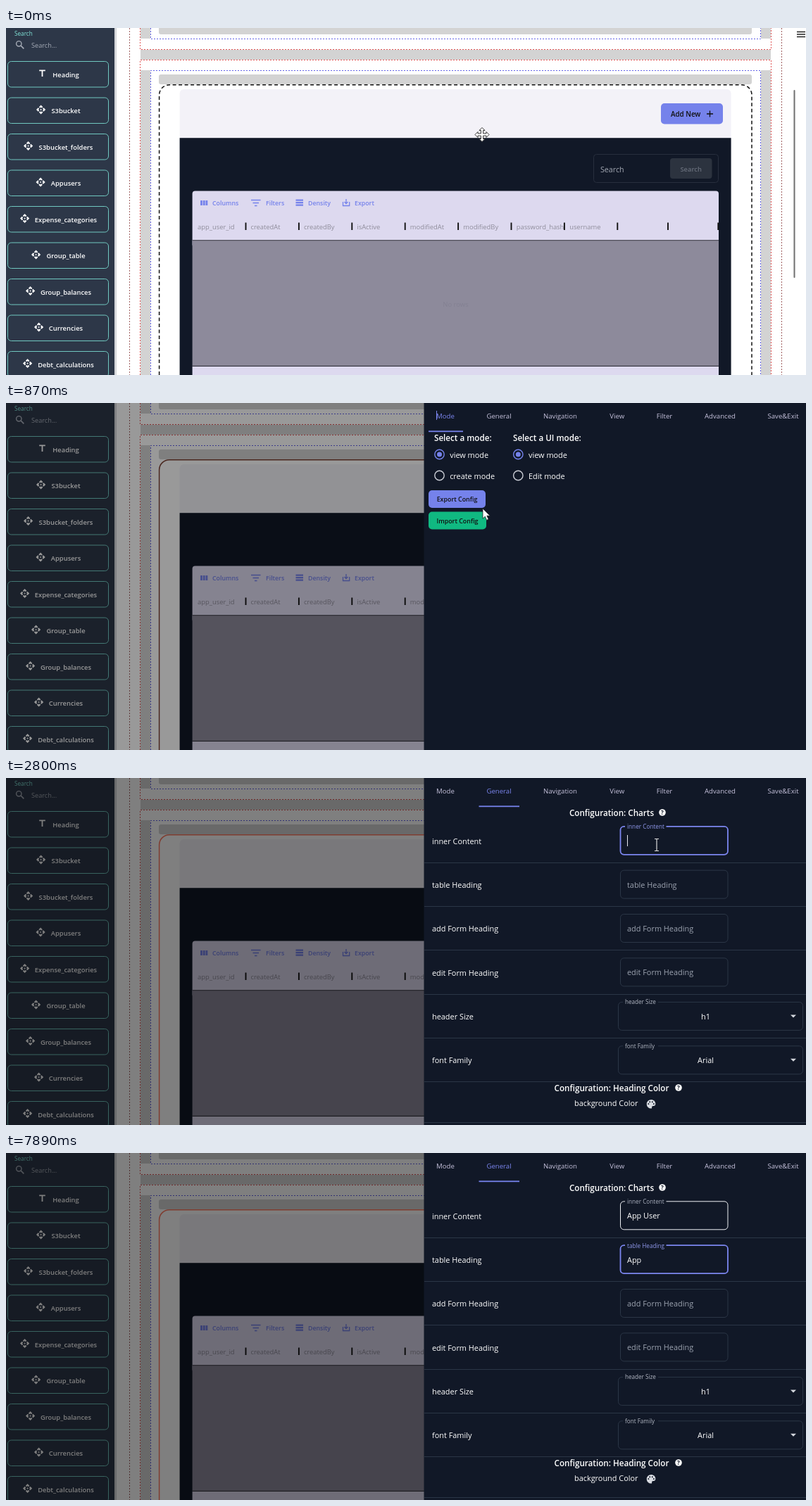
Write an HTML page that moves like this. It is 1136 px wide and 493 px high and loops after 8000 ms.

```html
<!DOCTYPE html>
<html lang="en">
<head>
<meta charset="utf-8">
<title>Table configuration</title>
<style>
  html, body { margin: 0; width: 100%; height: 100%; overflow: hidden; background: #fff; }
  svg { display: block; width: 100%; height: 100%; }
  text { font-family: "Open Sans", "Noto Sans", sans-serif; white-space: pre; }
</style>
</head>
<body>
<svg viewBox="0 0 1136 493">
  <defs>
    <g id="api">
      <path d="M0-2 2 0 0 2-2 0Z"/>
      <path id="chevron" d="M0-6 2.1-3.9 4.6-6.4 0-11-4.6-6.4-2.1-3.9Z"/>
      <use href="#chevron" transform="rotate(90)"/>
      <use href="#chevron" transform="rotate(180)"/>
      <use href="#chevron" transform="rotate(270)"/>
    </g>
  </defs>
  <g id="page"></g>
  <g id="overlay"></g>
</svg>
<script>
const LOOP = 8000;
const BLUE = '#7582eb', DARK = '#111827', GRAY = '#d3d3d3', LILAC = '#ddd9ef', LINE = '#2b3646';
const $ = id => document.getElementById(id);
const clamp = v => Math.max(0, Math.min(1, v));

const text = (x, y, s, size, fill, more = '') =>
  `<text x="${x}" y="${y}" font-size="${size}" fill="${fill}" ${more}>${s.replace('&', '&amp;')}</text>`;
const rect = (x, y, w, h, fill, r = 0, more = '') =>
  `<rect x="${x}" y="${y}" width="${w}" height="${h}" rx="${r}" fill="${fill}" ${more}/>`;
const path = (d, stroke, width = 1, more = '') =>
  `<path d="${d}" fill="none" stroke="${stroke}" stroke-width="${width}" ${more}/>`;
const BOLD = 'font-weight="600"', MID = 'text-anchor="middle"', DOTS = 'stroke-dasharray="2 2"';

// Linear interpolation through [time, value...] keys
function along(keys, t) {
  if (t <= keys[0][0]) return keys[0].slice(1);
  for (let i = 1; i < keys.length; i++) {
    const [a, b] = [keys[i - 1], keys[i]];
    if (t < b[0]) return a.slice(1).map((v, k) => v + (b[k + 1] - v) * (t - a[0]) / (b[0] - a[0]));
  }
  return keys.at(-1).slice(1);
}

function sidebar() {
  // label and left edge of its text
  const items = [['Heading', 65.5], ['S3bucket', 64], ['S3bucket_folders', 46], ['Appusers', 63.5],
    ['Expense_categories', 41], ['Group_table', 57], ['Group_balances', 49], ['Currencies', 61], ['Debt_calculations', 45]];
  let s = rect(154, 0, 3, 493, '#d5d7da') + rect(0, 0, 154, 493, '#2d3748')
    + text(12, 11, 'Search', 8.2, '#81e6d9')
    + '<circle cx="18.3" cy="22.3" r="3.7" fill="none" stroke="#a5abb6" stroke-width="1.4"/>'
    + path('M21 25 25.3 29.3', '#a5abb6', 1.7)
    + text(36, 28, 'Search...', 9.2, '#a5abb6');
  items.forEach(([label, left], i) => {
    const y = 47.5 + 51.5 * i;
    s += rect(2.5, y, 143, 36.5, 'none', 5, 'stroke="#70c8c0"')
      + text(85, y + 22.4, label, 9.4, '#fff', `${BOLD} ${MID}`)
      + (i ? `<use href="#api" fill="#fff" transform="translate(${left - 14.4} ${y + 17}) scale(.6)"/>`
           : path('M47.2 60.4H55.8M51.5 60V69', '#fff', 1.8));
  });
  return s;
}

function canvasArea() {
  return path('M175.5 0V493M1101.5 0V493', '#a06060', 1, DOTS)
    + rect(191, 0, 14, 15, GRAY) + rect(1072, 0, 14, 15, GRAY)
    + rect(191, 31, 895, 14, GRAY)
    + rect(191, 60, 14, 433, GRAY) + rect(1072, 60, 14, 433, GRAY)
    + rect(217, -8, 842, 17, GRAY, 3) + rect(217, 66, 842, 14, GRAY, 3)
    + path('M190.5 0V30.5H1086.5V0M190.5 493V45.5H1086.5V493', '#e05555', 1, DOTS)
    + path('M205.5 0V15.5H1071.5V0M205.5 493V60.5H1071.5V493', '#6262e6', 1, DOTS)
    + '<path id="selection" d="M217.6 493V95A14.4 14.4 0 0 1 232 80.7H1044.6A14.4 14.4 0 0 1 1059 95V493" fill="none" stroke-width="1.5"/>';
}

function tableCard() {
  const columns = ['app_user_id', 'createdAt', 'createdBy', 'isActive', 'modifiedAt', 'modifiedBy', 'password_hash', 'username'];
  let s = rect(246.6, 87, 783, 90, '#f3f2f8', 6) + rect(246.6, 156.2, 783, 337, DARK)
    + rect(930, 107, 88, 29.5, BLUE, 5) + text(944, 126, 'Add New', 9.8, '#111', BOLD)
    + path('M995 122H1004M999.5 117.5V126.5', '#111', 1.3)
    + rect(834.5, 179.5, 177, 40, 'none', 4, 'stroke="#272e3d"')
    + text(844, 204.5, 'Search', 10.7, '#a3a8b3')
    + rect(943, 185, 59.5, 29, '#2c333f', 4) + text(972.7, 203.5, 'Search', 9.4, '#686e7b', `${BOLD} ${MID}`)
    + rect(264.6, 231.6, 747.4, 80, LILAC, 4)
    + rect(264.6, 302, 747.4, 178.5, '#8d8a9b') + rect(264.6, 481, 747.4, 12, LILAC)
    + path('M264.6 301.7H1012M264.6 480.3H1012', '#34333d')
    + text(638.5, 395.5, 'No rows', 9.5, '#838092', MID);
  [['Columns', 293], ['Filters', 369], ['Density', 429], ['Export', 495]].forEach(([label, x]) =>
    s += text(x, 252, label, 8.8, BLUE, BOLD));
  s += path('M277.5 245V252M281.2 245V252M284.9 245V252', BLUE, 2.8)
    + path('M348 244.5H361.5M350.5 248.5H359M353 252.5H356.5', BLUE, 1.4)
    + path('M411.5 244.7H422M411.5 248.2H422M411.5 251.7H422', BLUE, 2.2)
    + path('M478.5 247V252.5H487.7V247M483 243V249.5M480.5 247 483 249.5 485.5 247', BLUE, 1.3);
  columns.forEach((label, i) => s += text(272 + 75.45 * i, 286, label, 9.4, '#8f8d9b'));
  [0, 1, 2, 3, 4, 5, 6, 7].map(i => 340.5 + 75.4 * i).concat(940, 1011.3).forEach(x =>
    s += path(`M${x} 276.5V287`, '#111', 1.9));
  return s;
}

$('page').innerHTML = rect(0, 0, 1136, 493, '#fff') + canvasArea() + tableCard()
  + rect(1118.5, 88, 2, 267, '#707070', 1) + path('M1123 5.5H1135M1123 9H1135M1123 12.5H1135', '#222', 1.5) + sidebar();

const pen = document.createElement('canvas').getContext('2d');
pen.font = '10.9px "Open Sans", "Noto Sans", sans-serif';
const typed = (s, times, t) => s.slice(0, times.filter(at => t >= at).length);
const caret = (s, y) => path(`M${882.5 + pen.measureText(s).width} ${y - 8}V${y + 8}`, '#e8e8f0');

function tabs(active) {
  const labels = [['Mode', 624], ['General', 700], ['Navigation', 787], ['View', 867.7], ['Filter', 935], ['Advanced', 1014], ['Save&Exit', 1103.5]];
  return labels.map(([label, x]) => text(x, 21.5, label, 9.65, label === active ? '#7c86f0' : '#c6c2dc', MID)).join('')
    + (active === 'Mode' ? rect(600, 39.4, 49, 1.8, BLUE) + path('M611.5 11V24', '#7c86f0') : rect(671.5, 39.4, 57.5, 1.8, BLUE));
}

function modeContent() {
  const radio = (x, y, label, on) =>
    `<circle cx="${x}" cy="${y}" r="6.7" fill="none" stroke="${on ? BLUE : '#c9ccd4'}" stroke-width="1.4"/>`
    + (on ? `<circle cx="${x}" cy="${y}" r="3.5" fill="${BLUE}"/>` : '')
    + text(x + 14.7, y + 4.7, label, 10.9, '#fff');
  return text(608, 54, 'Select a mode:', 11.65, '#fff', BOLD) + text(720, 54, 'Select a UI mode:', 11.65, '#fff', BOLD)
    + radio(615.5, 73, 'view mode', true) + radio(615.5, 103, 'create mode')
    + radio(727.3, 73, 'view mode', true) + radio(727.3, 103, 'Edit mode')
    + rect(600, 124, 81, 25, BLUE, 5) + text(640.5, 140, 'Export Config', 8.9, '#111', `${BOLD} ${MID}`)
    + rect(600, 154.5, 82, 25, '#10b981', 5) + text(641, 171, 'Import Config', 8.9, '#111', `${BOLD} ${MID}`);
}

// Outlined text field; its label floats up into the border after focusAt
function field(y, label, value, t, focusAt = Infinity, blurAt = Infinity) {
  const u = clamp((t - focusAt + 20) / 200);
  const open = t >= focusAt, focused = open && t < blurAt;
  const lift = open ? 1 - (1 - u) ** 3 : 0;
  const size = 10.9 - 2.7 * lift;
  const stroke = focused ? '#7c86f0' : open ? '#eef0f4' : LINE;
  return rect(872.5, y - 20.2, 152.5, 40, 'none', 5, `stroke="${stroke}" stroke-width="${focused ? 1.8 : 1}"`)
    + (lift > .6 ? rect(879, y - 22, 58.5, 4, DARK) : '')
    + text(882, y + 4.2 - 21 * lift, label, size, t < focusAt ? '#9ca3b0' : focused || t < blurAt + 200 ? '#8f97ea' : '#aab0be')
    + text(882, y + 4.2, value, 10.9, '#fff');
}

function select(y, label, value) {
  return rect(869.5, y - 20, 262, 40, 'none', 5, `stroke="${LINE}"`) + rect(876, y - 22, 50, 4, DARK)
    + text(879, y - 17, label, 8.15, '#b3b8c4') + text(993.5, y + 4.2, value, 10.9, '#fff', MID)
    + `<path d="M1114 ${y - 2}h8l-4 4Z" fill="#d5d8de"/>`;
}

function generalContent(t) {
  const rows = ['inner Content', 'table Heading', 'add Form Heading', 'edit Form Heading', 'header Size', 'font Family'];
  const rowY = i => 89 + 62.35 * i;
  const first = typed('App User', [3340, 3540, 3660, 3860, 4400, 4530, 4670, 4870], t);
  const second = typed('App ', [6950, 7150, 7280, 7420], t);
  const help = (x, y) => `<circle cx="${x}" cy="${y}" r="4.8" fill="#fff"/>`
    + text(x, y + 3, '?', 8, DARK, `font-weight="700" ${MID}`);
  let s = text(860, 54, 'Configuration: Charts', 11.67, '#fff', `${BOLD} ${MID}`) + help(932, 49);
  rows.forEach((label, i) => s += text(605, rowY(i) + 4.6, label, 10.9, '#fff')
    + path(`M594 ${Math.round(rowY(i) + 30.6)}.5H1136`, LINE));
  s += field(rowY(0), rows[0], first, t, 2660, 5740) + field(rowY(1), rows[1], second, t, 5740)
    + field(rowY(2), rows[2], '', t) + field(rowY(3), rows[3], '', t)
    + select(rowY(4), rows[4], 'h1') + select(rowY(5), rows[5], 'Arial')
    + text(860, 445, 'Configuration: Heading Color', 11.67, '#fff', `${BOLD} ${MID}`) + help(955, 440)
    + text(807, 466, 'background Color', 10.9, '#fff')
    + '<path d="M916 457a6.3 6.3 0 1 0 0 12.6c2 0 .5-2.4 1.6-3.2 1.2-.8 4.7.4 4.7-3.6 0-3.4-2.8-5.8-6.3-5.8Z" fill="#d8dbe1"/>'
    + [[912.3, 463], [914.2, 460.2], [917.8, 460.2], [919.8, 463]].map(([x, y]) =>
      `<circle cx="${x}" cy="${y}" r="1" fill="${DARK}"/>`).join('')
    + path('M594 489.5H1136', LINE);
  const firstOn = t >= 2660 && t < 4330 || t >= 4400 && t < 5470;
  const secondOn = t >= 5740 && t < 6280 || t >= 6810 && t < 7890;
  return s + (firstOn ? caret(first, rowY(0)) : '') + (secondOn ? caret(second, rowY(1)) : '');
}

const CURSORS = {
  move: '<path d="M0-10 4-6H1.6V-1.6H6V-4L10 0 6 4V1.6H1.6V6H4L0 10-4 6H-1.6V1.6H-6V4L-10 0-6-4V-1.6H-1.6V-6H-4Z" fill="#fff" stroke="#333"/>',
  arrow: '<path d="M0 0V14.2L3.3 11.2 5.6 16.4 8.2 15.2 5.9 10.2H10.3Z" fill="#fff" stroke="#222" stroke-width=".8"/>',
  hand: '<path d="M-1.6 10V1Q-1.6-.7 0-.7T1.6 1V5.4Q3.6 4.6 4.2 6.2 5.8 5.6 6 7.2 7.4 6.8 7.4 8.4V12Q7.4 14 5.6 16.5H-1.4Q-2.6 13.5-5.4 10.5-6.4 9-5 8.2-3.6 8-1.6 10Z" fill="#fff" stroke="#222" stroke-width=".8"/>',
  beam: '<path d="M-3-8.5H3M-3 8.5H3M0-8.5V8.5" fill="none" stroke="#ddd" stroke-width="1.2"/>'
};

function pointer(t) {
  if (t >= 3340) return '';
  let [x, y] = along([[920, 677, 150], [1460, 678.5, 22], [1650, 683, 22], [2130, 683, 22], [2590, 924, 95]], t);
  let kind = t < 1400 || t > 2200 ? 'arrow' : 'hand';
  if (t < 670) [kind, x, y] = ['move', 676, t < 270 ? 151.5 : 150.7];
  else if (x > 890) kind = 'beam';
  return `<g transform="translate(${x} ${y})" stroke-linejoin="round">${CURSORS[kind]}</g>`;
}

function draw(t) {
  const selected = t >= 670;
  const [r, g, b] = along([[800, 17, 17, 17], [960, 255, 122, 96]], t);
  $('selection').setAttribute('stroke', selected ? `rgb(${r},${g},${b})` : '#111');
  $('selection').setAttribute('stroke-dasharray', selected ? 'none' : '5 3.5');

  let s = '';
  if (t >= 740) {
    const [dim] = along([[740, 0], [800, .1], [870, .4], [940, .5]], t);
    const general = t >= 2060;
    s = rect(0, 0, 1136, 493, '#000', 0, `opacity="${dim}"`) + rect(593.5, 0, 542.5, 493, DARK)
      + tabs(general ? 'General' : 'Mode') + (general ? generalContent(t) : modeContent());
  }
  $('overlay').innerHTML = s + pointer(t);
}

const start = performance.now();
function tick() {
  draw((performance.now() - start) % LOOP);
  requestAnimationFrame(tick);
}
tick();
</script>
</body>
</html>
```
